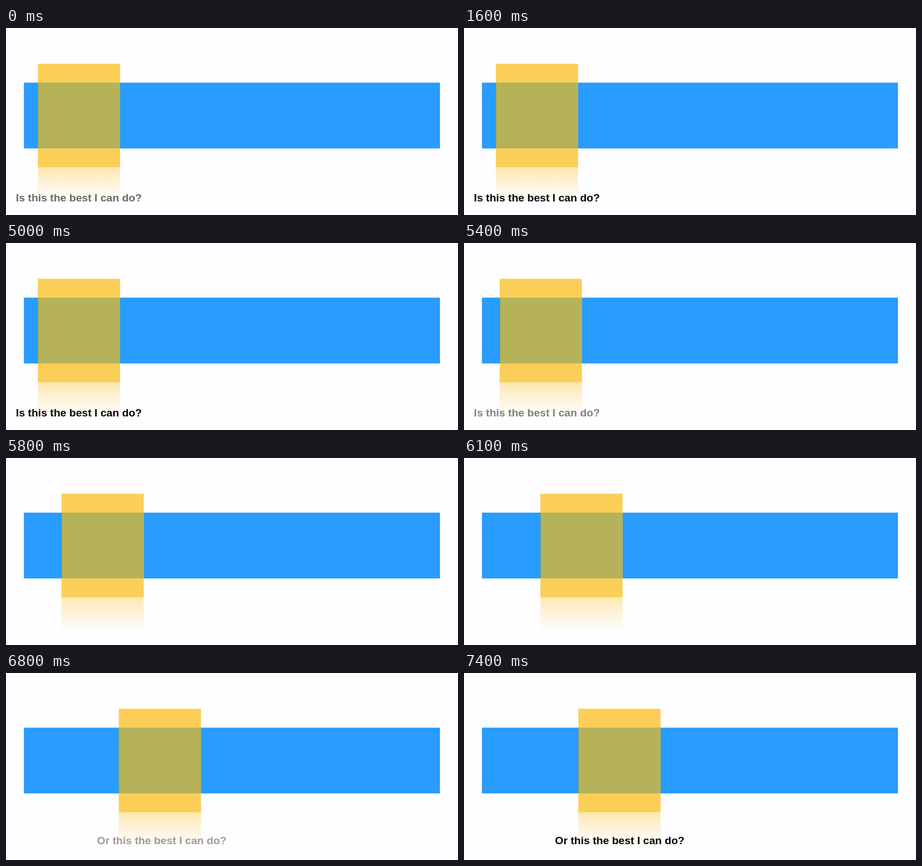
Recreate the animation shown at these times as an HTML page. Size 800 by 331 pixels, loop 8 s.

```html
<!DOCTYPE html>
<html lang="en">
<head>
<meta charset="utf-8">
<title>Sliding window</title>
<style>
  html, body { margin: 0; height: 100%; overflow: hidden; background: #fefdff; }
  svg { display: block; width: 800px; height: 331px; }
  text { font: bold 19.1px "Liberation Sans", Arial, sans-serif; fill: #050505; }
</style>
</head>
<body>
<svg viewBox="0 0 800 331">
  <defs>
    <linearGradient id="fade" x1="0" y1="0" x2="0" y2="1">
      <stop offset="0" stop-color="#fbcf57" stop-opacity=".46"/>
      <stop offset=".5" stop-color="#fbcf57" stop-opacity=".2"/>
      <stop offset="1" stop-color="#fbcf57" stop-opacity="0"/>
    </linearGradient>
  </defs>
  <rect x="31.7" y="96.7" width="735.8" height="116.5" fill="#299cff"/>
  <rect x="766.7" y="97" width=".8" height="116" fill="#1d6fae"/>
  <g id="pane">
    <rect y="63.3" width="145.6" height="183.4" fill="#fbcf57"/>
    <rect y="96.7" width="145.6" height="116.5" fill="#b5b25a"/>
    <rect y="97" width=".8" height="116" fill="#5f8f7c"/>
    <rect y="247" width="145.6" height="61" fill="url(#fade)"/>
  </g>
  <text id="first" x="17.6" y="307">Is this the best I can do?</text>
  <text id="second" x="161.1" y="303.4">Or this the best I can do?</text>
</svg>
<script>
  const LOOP = 8000;
  const [pane, first, second] = ['pane', 'first', 'second'].map(id => document.getElementById(id));

  // Progress from 0 to 1 between two times
  const ramp = (t, from, to) => Math.min(1, Math.max(0, (t - from) / (to - from)));
  const ease = u => (1 - Math.cos(Math.PI * u)) / 2;

  function draw(now) {
    const t = now % LOOP;
    const x = 56.3 + 146 * ease(ramp(t, 5150, 6960));
    pane.setAttribute('transform', `translate(${x} 0)`);
    first.style.opacity = ramp(t, -600, 420) * (1 - ramp(t, 5050, 5750));
    second.style.opacity = ramp(t, 6430, 7400);
  }

  const start = performance.now();
  function tick() {
    draw(performance.now() - start);
    requestAnimationFrame(tick);
  }
  tick();
</script>
</body>
</html>
```
